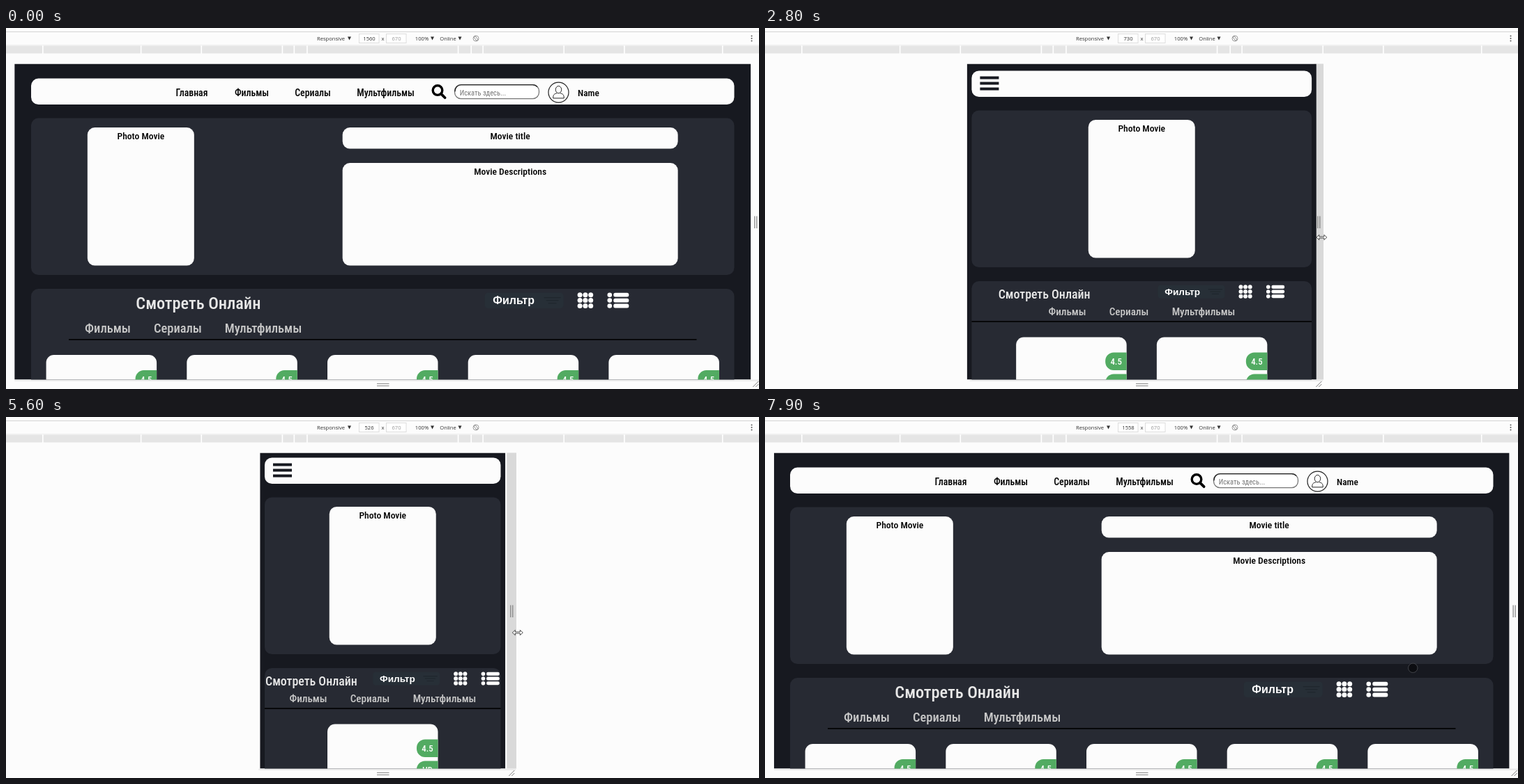
An HTML page for the animation above (8000 ms loop, 1080 by 519 pixels).

```html
<!DOCTYPE html>
<html lang="ru">
<head>
<meta charset="utf-8">
<title>Responsive preview</title>
<style>
  html, body { margin: 0; height: 100%; overflow: hidden; background: #fcfcfc; }
  svg { display: block; width: 100vw; height: 100vh; }
  text { text-anchor: middle; }
  .site { font-family: "Roboto Condensed", Roboto, sans-serif; font-stretch: 75%; font-weight: 500; }
  .light { font-weight: 400; }
  .bold { font-family: "Liberation Sans", Arial, sans-serif; font-weight: 700; }
  .tool { font-family: "Open Sans", "Noto Sans", sans-serif; }
</style>
</head>
<body>
<svg id="stage" viewBox="0 0 1080 519"></svg>
<script>
const LOOP = 8000, STEP = 100, LAG = 22;
const CENTER = 540.25, SCALE = 0.677, TOP = 51.5, BOTTOM = 505.5;
const PAGE = '#171920', PANEL = '#272a33', WHITE = '#fcfcfc';
const stage = document.getElementById('stage');

// time, viewport width, cursor offset from the viewport edge, cursor y
const DRAG = [
  [900, 1560, 5, 284], [1200, 1560, 5, 284], [1300, 1542, 4, 284], [1500, 1358, 4, 285],
  [1600, 1358, 4, 285], [1900, 1174, 3.3, 288], [2500, 824, 9, 298], [2600, 824, 9, 298],
  [2800, 730, 11, 301], [3500, 500, 11, 308], [3600, 500, 11, 308], [3800, 454, 11, 308.5],
  [4200, 372, 12, 310], [4500, 330, 13, 310], [4700, 330, 13, 310], [4900, 334, 13.5, 310],
  [5600, 526, 15.5, 310], [5800, 612, 15.5, 310], [5900, 612, 15.5, 310], [6300, 782, 15.5, 309],
  [6800, 1045, 14, 309], [6900, 1045, 14, 309], [7700, 1540, 8, 309], [7800, 1558, 7, 309]
];
const PAUSES = [1600, 2600, 3600, 4600, 4700, 5900, 6900];

function dragAt(t) {
  const next = DRAG.findIndex(k => k[0] >= t);
  if (next === 0) return DRAG[0];
  if (next < 0) return DRAG[DRAG.length - 1];
  const a = DRAG[next - 1], b = DRAG[next], u = (t - a[0]) / (b[0] - a[0]);
  return a.map((v, i) => v + (b[i] - v) * u);
}

let fontUnit = 1;
const rect = (x, y, w, h, r, fill, extra = '') =>
  `<rect x="${x}" y="${y}" width="${w}" height="${h}" rx="${r}" fill="${fill}" ${extra}/>`;
const circle = (x, y, r, fill, extra = '') =>
  `<circle cx="${x}" cy="${y}" r="${r}" fill="${fill}" ${extra}/>`;
const path = (d, fill, extra = '') => `<path d="${d}" fill="${fill}" ${extra}/>`;
const line = (d, color, width, cap = 'butt') =>
  path(d, 'none', `stroke="${color}" stroke-width="${width}" stroke-linecap="${cap}"`);
const group = (x, y, body, scale = 1) =>
  `<g transform="translate(${x} ${y}) scale(${scale})">${body}</g>`;
const text = (x, y, size, str, fill = '#000', cls = 'site') =>
  `<text x="${x}" y="${y}" font-size="${size}" fill="${fill}" class="${cls}">${str}</text>`;
const label = (x, y, size, str, fill, cls) => text(x, y, size * fontUnit, str, fill, cls);

function toolbar(width) {
  const arrow = x => path(`M${x} 12.5h5l-2.5 5z`, '#333');
  const tool = (x, str, fill = '#333') => text(x, 18, 7.6, str, fill, 'tool');
  const field = x => rect(x, 8.5, 28.5, 13, 0, '#fff', 'stroke="#ddd"');
  const marks = [1440, 1024, 768, 425, 375, 320].flatMap(w =>
    [-1, 1].map(side => rect(CENTER + side * w * SCALE / 2 - 0.8, 25, 1.6, 12, 0, '#fff')));
  return line('M0 5.5H1080', '#d4d4d4', 1) + line('M0 24.5H1080', '#eee', 1) +
    rect(0, 25.5, 1080, 11, 0, '#e5e5e5') + marks.join('') +
    tool(466, 'Responsive') + arrow(490) + field(506.5) + tool(521, Math.round(width)) +
    tool(540.5, 'x') + field(545.5) + tool(560, 670, '#999') +
    tool(596.5, '100%') + arrow(609) + tool(634, 'Online') + arrow(648.5) +
    circle(674, 15, 4, 'none', 'stroke="#777" stroke-width=".7"') +
    line('M671.2 13.4l2-1.8 3.6 5-2 1.8z', '#666', 0.7) +
    [11.5, 15, 18.5].map(y => circle(1069.5, y, 1, '#555')).join('');
}

function header(width, left, y) {
  if (width <= 768)
    return [8, 16, 24].map(dy => rect(left + 12, y + dy, 27, 4, 0, PAGE)).join('');
  const wide = width > 1024;
  const [centers, searchX, avatarX, nameX] = wide
    ? [[266.5, 352.5, 440, 544.5], 621, 792.5, 835.5]
    : [[364.5, 432.5, 503, 590], 657.5, 696.5, 733.5];
  const links = ['Главная', 'Фильмы', 'Сериалы', 'Мультфильмы'];
  const search = circle(-2, -2, 6.8, 'none', 'stroke="#000" stroke-width="3.4"') +
    line('M3 3L8.6 8.6', '#000', 3.8, 'round');
  const thin = 'stroke="#222" stroke-width="1"';
  const avatar = circle(0, 0, 14.5, '#fff', 'stroke="#222" stroke-width="1.2"') +
    path('M-2.5 1.2C-6 2-7.8 3-7.8 8.3H7.8C7.8 3 6 2 2.5 1.2', 'none', thin) +
    `<ellipse cy="-4" rx="4.2" ry="5.2" fill="#fff" ${thin}/>`;
  const input = rect(643.5, y + 9, 121, 20, 9, '#fff', 'stroke="#767676" stroke-width="1.3"') +
    line(`M644 ${y + 19}v-1a9 9 0 0 1 9-9h102a9 9 0 0 1 7 3`, '#222', 1.3) +
    label(684, y + 24, 10.8, 'Искать здесь...', '#757575', 'site light');
  return links.map((s, i) => label(centers[i], y + 25, 14.2, s)).join('') +
    group(searchX, y + 19, search) + group(avatarX, y + 20, avatar) +
    label(nameX, y + 25, 13.8, 'Name') + (wide ? input : '');
}

function movie(width, left, inner, y) {
  const box = (x, dy, w, h, str) => rect(x, y + dy, w, h, 10.5, WHITE) +
    label(x + w / 2, y + dy + 17, 14, str);
  const photoW = 153, top = 13.5;
  if (width <= 1024) return box(CENTER - photoW / 2, top, photoW, 198.5, 'Photo Movie');
  const [infoW, extra] = width > 1440 ? [481, 132] : [338.5, 17];
  const gap = (inner - photoW - infoW - extra) / 3;
  const infoX = left + inner - gap - infoW;
  return box(left + gap, top, photoW, 198.5, 'Photo Movie') +
    box(infoX, top, infoW, 30.5, 'Movie title') +
    box(infoX, 64.5, infoW, 147.5, 'Movie Descriptions');
}

// Filter button with the grid and list icons, centred vertically on y
function controls(x, y, scale, gap) {
  const rows = [-7.9, 0, 7.9];
  const filter = rect(0, -11.2, 113, 22.5, 5, '#272f37') +
    text(41.5, 5.5, 16, 'Фильтр', '#fff', 'bold') +
    line('M85 -4H109M88 0H106M91 4H103', '#1f262d', 1.3);
  const grid = rows.flatMap(dy => [3.5, 11.3, 19.1].map(dx => circle(dx, dy, 3.5, '#fff'))).join('');
  const list = rows.map(dy => circle(3.5, dy, 3.3, '#fff') + rect(9, dy - 2.9, 22, 5.8, 2.5, '#fff')).join('');
  const gridX = x + 113 * scale + gap;
  return group(x, y, filter, scale) + group(gridX, y, grid, scale) +
    group(gridX + 22.7 * scale + gap, y, list, scale);
}

function card(x, y) {
  const badge = (dy, str) =>
    path(`M${x + 158.5} ${y + dy}h-18.5a12 12 0 0 0-12 12v1.5a12 12 0 0 0 12 12h18.5z`, '#52ab62') +
    label(x + 143.5, y + dy + 17.8, 13.2, str, '#fff');
  return rect(x, y, 158.5, 210, 11, WHITE) + badge(22, '4.5') + badge(53, 'HD');
}

function catalog(width, left, inner, y) {
  const large = { title: 25, titleW: 178, ctrlW: 207, scale: 1, ctrlY: 16.5, tab: 19,
    tabs: [110, 210.5, 333].map(x => left + x), tabY: 62.5, rule: 72.8, cards: 95 };
  const medium = { title: 18.4, titleW: 131, ctrlW: 182, scale: 0.85, ctrlY: 15, tab: 15.6,
    tabs: [433.5, 522, 629], tabY: 48.5, rule: 58, cards: 80.5 };
  const small = { ctrlW: 167, scale: 0.85, ctrlY: 16, tab: 14.4,
    tabs: [460.5, 524, 604], tabY: 45.5, rule: 54, cards: 76.3 };
  const look = width > 1024 ? large : width > 480 ? medium : small;

  let out = '', ctrlX = CENTER - look.ctrlW / 2;
  if (look.title) {
    const side = (inner - look.titleW - look.ctrlW - 20) / 4;
    ctrlX = left + inner - side - look.ctrlW;
    out += label(left + side + look.titleW / 2, y + look.ctrlY + look.title * 0.4 + 2.5, look.title,
      'Смотреть Онлайн', '#e8e8e8');
  }
  out += controls(ctrlX, y + look.ctrlY, look.scale, look.title ? 20 : 14);
  out += ['Фильмы', 'Сериалы', 'Мультфильмы'].map((s, i) =>
    label(look.tabs[i], y + look.tabY, look.tab, s, '#c8c8c8')).join('');
  const ruleW = Math.min(900.5, inner);
  out += rect(CENTER - ruleW / 2, y + look.rule - 0.8, ruleW, 1.6, 0, '#000');

  const pitch = 201.7, columns = Math.max(1, Math.floor(inner / pitch + 0.01));
  for (let i = 0; i < columns; i++)
    out += card(CENTER + (i - (columns - 1) / 2) * pitch - 79.25, y + look.cards);
  return out;
}

function page(width) {
  const w = width * SCALE, inner = Math.min(1008.5, w - 13.5);
  const left = CENTER - inner / 2, y = TOP + w * 0.02;
  return `<clipPath id="view">${rect(CENTER - w / 2, TOP, w, BOTTOM - TOP, 0, '#000')}</clipPath>` +
    '<g clip-path="url(#view)">' + rect(CENTER - w / 2, TOP, w, BOTTOM - TOP, 0, PAGE) +
    rect(left, y, inner, 37.5, 10.5, WHITE) + header(width, left, y) +
    rect(left, y + 57, inner, 225.5, 10.5, PANEL) + movie(width, left, inner, y + 57) +
    rect(left, y + 302.5, inner, 300, 10.5, PANEL) + catalog(width, left, inner, y + 302.5) + '</g>';
}

function handles(edge, hovered) {
  const x = edge + 7;
  const left = 2 * CENTER - edge;
  return (hovered ? rect(edge, TOP, 13.7, BOTTOM - TOP, 0, '#d9d9d9') : '') +
    rect(left, BOTTOM, edge + 13 - left, 2.5, 1, '#ececec') +
    line('M532 511.5h17.5M532 514.5h17.5', '#888', 1) +
    line(`M${x - 4} 516l8-8M${x} 516l4-4`, '#777', 1);
}

const grip = edge => line(`M${edge + 5.5} 270.5v17.5M${edge + 8.5} 270.5v17.5`, '#777', 1.1);

function cursor(t, edge, dx, y) {
  const touch = (cx, cy) => circle(cx, cy, 6.7, '#0c0d11', 'stroke="#44464c" stroke-width="1"');
  if (t < 200) return '';
  if (t < 900) {
    const u = (t - 200) / 700, px = 66 + 1009 * u, py = 290 - 1156 * u * (1 - u);
    return py > TOP ? touch(px, py)
      : group(px, py, path('M0 0v12l3-3 2 4 2-1-2-4h4z', '#fff', 'stroke="#000" stroke-width=".8"'));
  }
  if (t >= 7900) return touch(929.3, 360.8);
  return group(edge + dx, y, path('M-7.5 0l4-3.6v2.6h7v-2.6l4 3.6-4 3.6v-2.6h-7v2.6z', '#fff',
    'stroke="#222" stroke-width=".8"'));
}

function draw(time) {
  let t = time;
  while (PAUSES.includes(t)) t -= STEP;
  const [, width, dx, y] = dragAt(t);
  const edge = CENTER + width * SCALE / 2;
  const hovered = t >= 900 && t < 7900;
  const shownWidth = t >= 7800 ? width : dragAt(t - LAG)[1];
  stage.innerHTML = rect(0, 0, 1080, 519, 0, WHITE) + toolbar(width) + handles(edge, hovered) +
    page(shownWidth) + grip(edge) + cursor(t, edge, dx, y);
}

// Keep the lettering the same overall size whichever condensed face is available
stage.innerHTML = text(0, 0, 100, 'Movie Descriptions');
fontUnit = 743 / stage.firstChild.getComputedTextLength();

let shown = -1;
function tick() {
  const time = Math.floor(performance.now() % LOOP / STEP) * STEP;
  if (time !== shown) draw(shown = time);
  requestAnimationFrame(tick);
}
tick();
</script>
</body>
</html>
```
